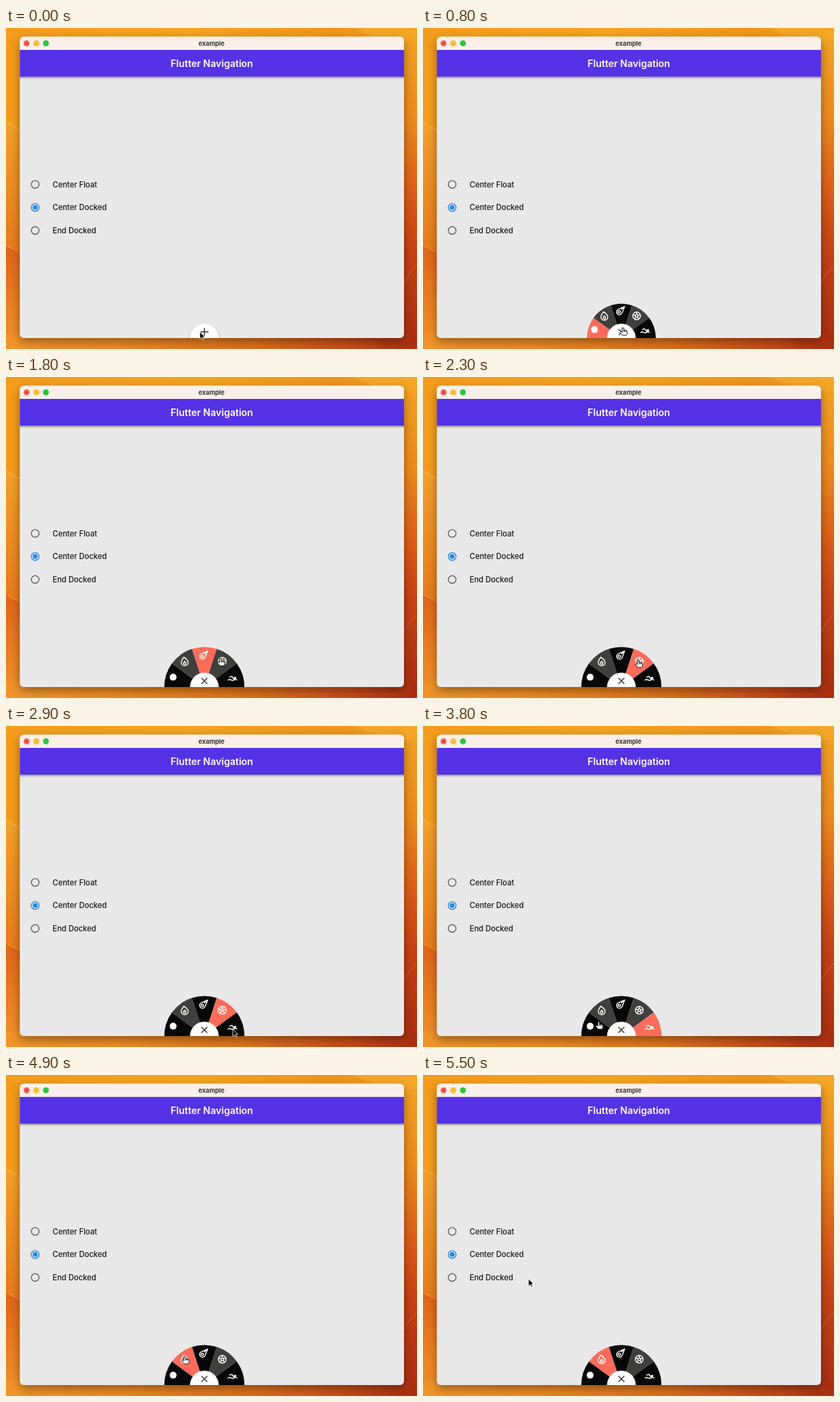
Write an HTML page that moves like this. It is 600 px wide and 469 px high and loops after 5600 ms.

```html
<!DOCTYPE html>
<html lang="en">
<head>
<meta charset="utf-8">
<title>Flutter Navigation</title>
<style>
  html, body { margin: 0; width: 100%; height: 100%; overflow: hidden; background: #ee911c; }
  svg { display: block; width: 100vw; height: 100vh; }
  text { font-family: Inter, Roboto, sans-serif; }
  .icon { fill: none; stroke: #fff; stroke-width: 1.4; stroke-linecap: round; stroke-linejoin: round; }
  .solid { fill: #fff; stroke: none; }
</style>
</head>
<body>
<svg viewBox="0 0 600 469" preserveAspectRatio="none">
  <defs>
    <linearGradient id="amber" x1="0" y1="0" x2="1" y2="0">
      <stop offset="0" stop-color="#f39b1b"/><stop offset=".45" stop-color="#f4a321"/>
      <stop offset=".8" stop-color="#ef9419"/><stop offset="1" stop-color="#f4a425"/>
    </linearGradient>
    <linearGradient id="leftFold" x1="0" y1="0" x2="0" y2="1">
      <stop offset="0" stop-color="#f2a02b"/><stop offset="1" stop-color="#e67a1a"/>
    </linearGradient>
    <linearGradient id="lowerLeftFold" x1="0" y1="0" x2="0" y2="1">
      <stop offset="0" stop-color="#e0641a"/><stop offset="1" stop-color="#f0942a"/>
    </linearGradient>
    <linearGradient id="rightFold" x1="0" y1="0" x2="0" y2="1">
      <stop offset="0" stop-color="#f3a022"/><stop offset=".25" stop-color="#ec8a1c"/>
      <stop offset=".47" stop-color="#dd6018"/><stop offset=".68" stop-color="#c54214"/>
      <stop offset="1" stop-color="#a92d11"/>
    </linearGradient>
    <linearGradient id="bottomFold" x1="0" y1="0" x2="1" y2="0">
      <stop offset="0" stop-color="#f0942a"/><stop offset=".28" stop-color="#ea8a20"/>
      <stop offset=".6" stop-color="#dc701b"/><stop offset=".85" stop-color="#c64917"/>
      <stop offset="1" stop-color="#a92d11"/>
    </linearGradient>
    <filter id="windowShadow" x="-10%" y="-10%" width="120%" height="120%">
      <feDropShadow dx="0" dy="5" stdDeviation="7" flood-opacity=".38"/>
    </filter>
    <filter id="softShadow" x="-30%" y="-30%" width="160%" height="180%">
      <feDropShadow dx="0" dy="1.7" stdDeviation="1.8" flood-opacity=".42"/>
    </filter>
    <clipPath id="windowClip"><rect x="20.2" y="12.7" width="560.8" height="440.3" rx="6"/></clipPath>
  </defs>

  <!-- Wallpaper -->
  <rect width="600" height="469" fill="url(#amber)"/>
  <path d="M505 0Q535 8 552 30H600V0Z" fill="#f5a626"/>
  <path d="M570 20H600V469H570Z" fill="url(#rightFold)"/>
  <path d="M0 137L30 155V330H0Z" fill="url(#leftFold)"/>
  <path d="M0 137L30 155" stroke="#f9bd4f"/>
  <path d="M0 318L30 333V469H0Z" fill="url(#lowerLeftFold)"/>
  <path d="M0 318L30 333" stroke="#f5a03c"/>
  <path d="M0 447H600V469H0Z" fill="url(#bottomFold)"/>
  <path d="M600 346Q588 358 580 374" fill="none" stroke="#d9662a"/>

  <!-- Window -->
  <rect x="20.2" y="12.7" width="560.8" height="440.3" rx="6" fill="#e9e8e9" filter="url(#windowShadow)"/>
  <g clip-path="url(#windowClip)">
    <rect x="15" y="32" width="572" height="39" fill="#5433e5" filter="url(#softShadow)"/>
    <rect x="20" y="12" width="562" height="20" fill="#faf0e9"/>
    <circle cx="30" cy="22.4" r="4.3" fill="#fc5b53"/>
    <circle cx="30" cy="22.4" r="1.2" fill="#b8362f"/>
    <circle cx="44.2" cy="22.4" r="4.3" fill="#fdbc30"/>
    <circle cx="58.3" cy="22.4" r="4.3" fill="#2bc43f"/>
    <text x="300" y="25.5" font-size="9.2" font-weight="700" fill="#373331" text-anchor="middle">example</text>
    <text x="300.5" y="57.2" font-size="14" font-weight="600" fill="#fff" text-anchor="middle">Flutter Navigation</text>
    <g id="options"></g>

    <g transform="translate(289.6 453)">
      <g id="wheel"></g>
      <g id="icons"></g>
      <circle id="hub" r="21" fill="#fff"/>
      <path id="cross" d="M-6 0H6M0-6V6" stroke="#333" stroke-width="1.4"/>
    </g>
  </g>

  <path id="arrow" d="M0 0V10.5L2.5 8.2L4.1 11.8L5.9 11L4.3 7.5H7.6Z" fill="#000" stroke="#fff" stroke-width=".8"/>
  <path id="hand" d="M-1.2 .6Q0-1 1.2 .6V3.8Q5.5 3 6.3 5.3V8Q6 9.8 4.8 11H-.8Q-2.8 9-4.2 6.6Q-3.7 4.7-2 5.8L-1.2 6.6ZM1.2 4V6M3 4V6M4.7 4.3V6" fill="#fff" stroke="#000" stroke-width=".9"/>
</svg>

<script>
const LOOP = 5600, STEP = 100, RADIUS = 58.5, ICON_RADIUS = 46.6;
const CENTER = { x: 289.6, y: 453 };
const OPEN_AT = 600, OPEN_FOR = 320;
const el = id => document.getElementById(id);

const spokes = Array.from({ length: 5 }, (_, i) => {
  const a = i * Math.PI * 2 / 5 - Math.PI / 2;
  const at = r => `${r * Math.cos(a)} ${r * Math.sin(a)}`;
  return { line: `M${at(2.3)}L${at(5.3)}`, corner: at(2.3) };
});

const icons = [
  '<circle class="solid" r="5"/>',
  '<path d="M-1.2-6Q5-2 5 2A5 4.4 0 0 1-5 2Q-5-1.2-1.2-6ZM0 0Q2.4 2 1.5 3.7Q0 5-1.6 3.7Q-2.2 2 0 0Z"/>',
  '<path d="M6-6L-2.5-2.3A4.2 4.2 0 1 0 2.4 3.4L6-6M6-6L1.4-2"/><circle cx="-1.7" cy="1.8" r="1.7"/>',
  `<circle r="5.6"/><path d="${spokes.map(s => s.line).join('')}"/><polygon points="${spokes.map(s => s.corner).join(' ')}"/>`,
  '<circle class="solid" cx="1.8" cy="1.2" r="1.9"/><path d="M-6-.2L-3-1.3L.2 2.6M-8.5 4.2Q-6.5 2.6-4.2 4T0 4T4.5 4"/>'
];

const polar = (r, degrees) => {
  const a = degrees * Math.PI / 180;
  return `${-r * Math.cos(a)} ${-r * Math.sin(a)}`;
};

el('wheel').innerHTML = icons.map((_, i) =>
  `<path d="M0 0L${polar(RADIUS, i * 36)}A${RADIUS} ${RADIUS} 0 0 1 ${polar(RADIUS, i * 36 + 36)}Z"/>`).join('');
el('icons').innerHTML = icons.map(icon => `<g class="icon">${icon}</g>`).join('');
const wedges = [...el('wheel').children], iconGroups = [...el('icons').children];

el('options').innerHTML = ['Center Float', 'Center Docked', 'End Docked'].map((label, i) => {
  const y = 228.5 + i * 33.7, chosen = i === 1;
  return `<circle cx="42.6" cy="${y}" r="5.6" fill="none" stroke="${chosen ? '#2087ee' : '#626162'}" stroke-width="1.4"/>
    ${chosen ? `<circle cx="42.6" cy="${y}" r="3.4" fill="#2087ee"/>` : ''}
    <text x="68" y="${y + 4}" font-size="11.1" font-weight="500" fill="#161616">${label}</text>`;
}).join('');

// [time, wedge index]
const selections = [[0, 0], [1400, 2], [2000, 3], [3100, 4], [4200, 0], [4900, 1]];

// [time, x, y, pointing hand]
const pointer = [
  [0, 283, 444, 0], [400, 291, 438, 1], [900, 292, 438, 1],
  [1300, 289, 404, 1], [1500, 289, 404, 1], [1800, 313, 411, 1], [2200, 313, 411, 1],
  [2800, 331, 443, 0], [3000, 331, 443, 1], [3300, 331, 440, 1],
  [4000, 238, 430, 1], [4300, 244, 434, 1], [4500, 244, 434, 1],
  [4800, 261, 411, 1], [5000, 261, 411, 1], [5500, 154, 298, 0], [5600, 154, 298, 0]
];

const clamp = v => Math.max(0, Math.min(1, v));
const smooth = p => p * p * (3 - 2 * p);

function drawPointer(t) {
  const i = pointer.findLastIndex(key => key[0] <= t);
  const [t0, x0, y0, pointing] = pointer[i], [t1, x1, y1] = pointer[i + 1];
  const p = smooth((t - t0) / (t1 - t0));
  const x = x0 + (x1 - x0) * p, y = y0 + (y1 - y0) * p;
  const hand = pointing && Math.hypot(x - CENTER.x, y - CENTER.y) < RADIUS;
  for (const [id, visible] of [['hand', hand], ['arrow', !hand]]) {
    el(id).setAttribute('transform', `translate(${x} ${y})`);
    el(id).style.display = visible ? '' : 'none';
  }
}

function draw(t) {
  const p = clamp((t - OPEN_AT) / OPEN_FOR);
  const opened = 1 - (1 - p) ** 2;
  el('wheel').setAttribute('transform', `scale(${opened})`);
  el('icons').style.display = p > 0 ? '' : 'none';
  iconGroups.forEach((icon, i) =>
    icon.setAttribute('transform', `translate(-1.3 0) translate(${polar(ICON_RADIUS * opened, i * 36 + 18)})`));
  el('hub').setAttribute('filter', p > 0 ? 'none' : 'url(#softShadow)');
  el('cross').setAttribute('transform', `translate(0 -9) rotate(${45 * opened})`);
  const selected = selections.findLast(([start]) => start <= t)[1];
  wedges.forEach((wedge, i) =>
    wedge.setAttribute('fill', i === selected ? '#fd6c5a' : i % 2 ? '#3f3f3d' : '#080808'));
  drawPointer(t);
}

function frame() {
  const t = performance.now() % LOOP;
  draw(Math.floor(t / STEP) * STEP);
  requestAnimationFrame(frame);
}
frame();
</script>
</body>
</html>
```
